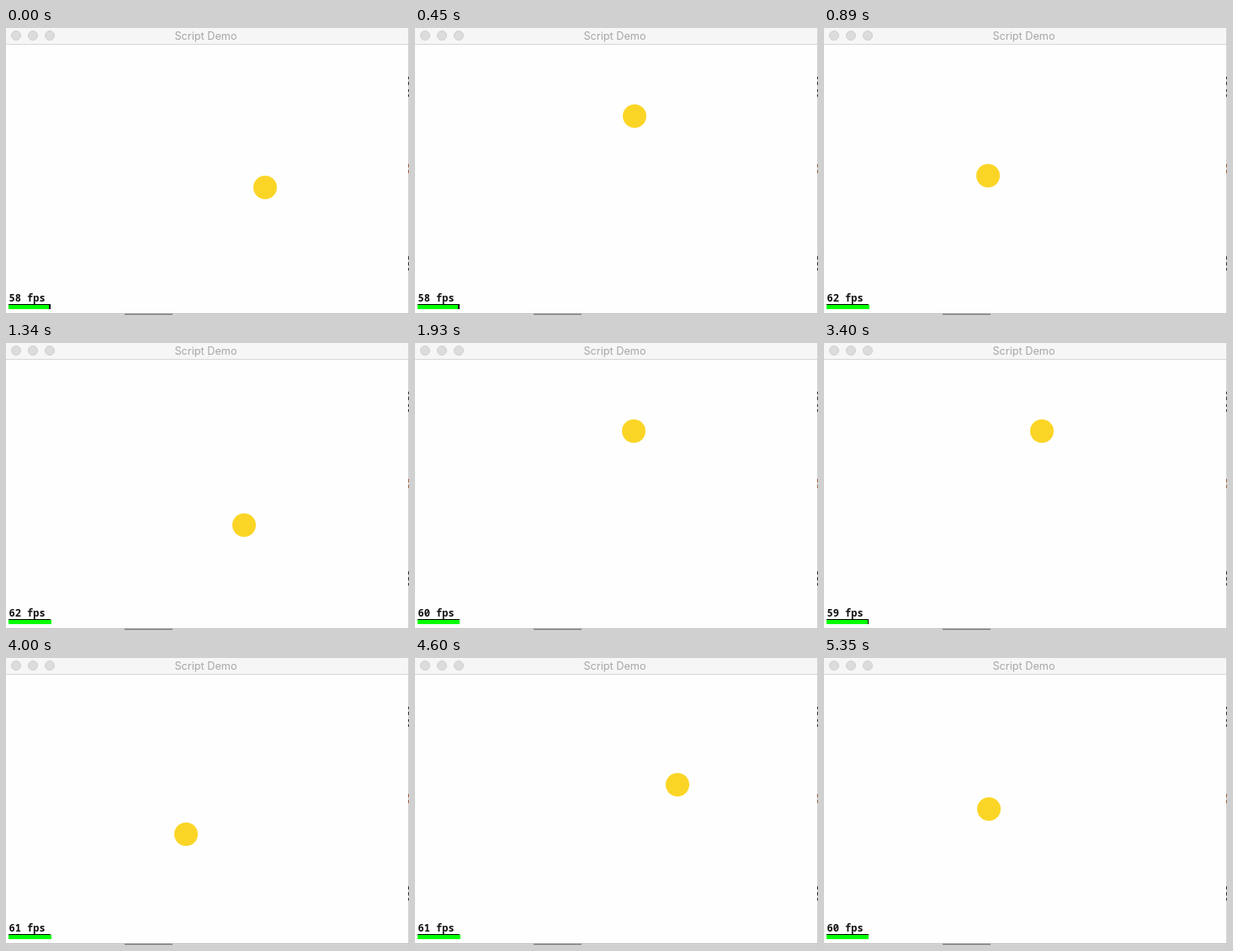
These frames come from a looping animation (479 px wide and 342 px high, 5.45 s). An HTML page:

```html
<!DOCTYPE html>
<html lang="en">
<head>
<meta charset="utf-8">
<title>Script Demo</title>
<style>
  html, body { margin: 0; width: 100%; height: 100%; overflow: hidden; background: #fefefe; }
  svg { display: block; width: 479px; height: 342px; }
  .title { font: 12.7px Inter, "Liberation Sans", sans-serif; fill: #a6a6a6; text-anchor: middle; }
  .fps { font: 600 12px "Noto Sans Mono", "DejaVu Sans Mono", monospace; fill: #111; white-space: pre; }
</style>
</head>
<body>
<svg viewBox="0 0 479 342">
  <rect width="479" height="342" fill="#fefefe"/>

  <!-- title bar -->
  <rect width="478" height="19" fill="#f6f6f6"/>
  <rect y="19" width="478" height="1" fill="#d6d6d6"/>
  <g fill="#dcdcdc" stroke="#d0d0d0">
    <circle cx="12" cy="9" r="5.5"/>
    <circle cx="32" cy="9" r="5.5"/>
    <circle cx="52" cy="9" r="5.5"/>
  </g>
  <text class="title" x="237.5" y="14">Script Demo</text>

  <!-- window edges and what shows behind them -->
  <rect x="478" width="1" height="342" fill="#d2d2d2"/>
  <path d="M478.5 58v3m0 3v4m0 5v3m0 3v3m0 190v4m0 3v4m0 3v3" stroke="#333"/>
  <path d="M478.5 162v4m0 3v4" stroke="#a0623c"/>
  <rect y="340" width="479" height="1" fill="#b9b9b9"/>
  <rect y="341" width="479" height="1" fill="#dedede"/>
  <rect x="141" y="340" width="57" height="2" fill="#8f8f8f"/>

  <!-- frame rate meter -->
  <text class="fps" id="label" x="3.5" y="326"></text>
  <rect x="3" y="329" width="50" height="6" fill="#000"/>
  <rect id="bar" x="3" y="330" height="5" fill="#00ff00"/>

  <circle id="ball" r="14" fill="#fbd526"/>
</svg>
<script>
  const LOOP = 5450, STEPS = 37;
  const CENTER = { x: 253.5, y: 164.7 }, RADIUS = 60;
  const shortSteps = [3, 10, 14, 17, 21];

  // [step, angle in degrees], turning counterclockwise
  const turns = [[0, 24.6], [3, -82.9], [9, -299.6], [18, -624.7],
                 [23, -804.8], [31, -1092.9], [36, -1275.1]];
  // [time in ms, frames per second]
  const rates = [[0, 58], [590, 62], [1640, 60], [2520, 59], [3700, 61], [4750, 60]];

  const starts = [0];
  for (let i = 0; i < STEPS - 1; i++) {
    starts.push(starts[i] + (shortSteps.includes(i) ? 140 : 150));
  }

  const ball = document.getElementById("ball");
  const bar = document.getElementById("bar");
  const label = document.getElementById("label");

  function angleAt(step) {
    let k = 0;
    while (k < turns.length - 2 && step >= turns[k + 1][0]) k++;
    const [s0, a0] = turns[k], [s1, a1] = turns[k + 1];
    return (a0 + (a1 - a0) * (step - s0) / (s1 - s0)) * Math.PI / 180;
  }

  function draw(now) {
    const t = now % LOOP;
    const step = starts.findLastIndex(s => s <= t);
    const angle = angleAt(step);
    ball.setAttribute("cx", Math.round(CENTER.x + RADIUS * Math.cos(angle)));
    ball.setAttribute("cy", Math.round(CENTER.y + RADIUS * Math.sin(angle)));

    const fps = rates.findLast(r => r[0] <= starts[step])[1];
    label.textContent = fps + " fps";
    bar.setAttribute("width", fps > 60 ? 51 : Math.floor(fps * 50 / 60));
  }

  const begin = performance.now();
  function tick() {
    draw(performance.now() - begin);
    requestAnimationFrame(tick);
  }
  tick();
</script>
</body>
</html>
```
